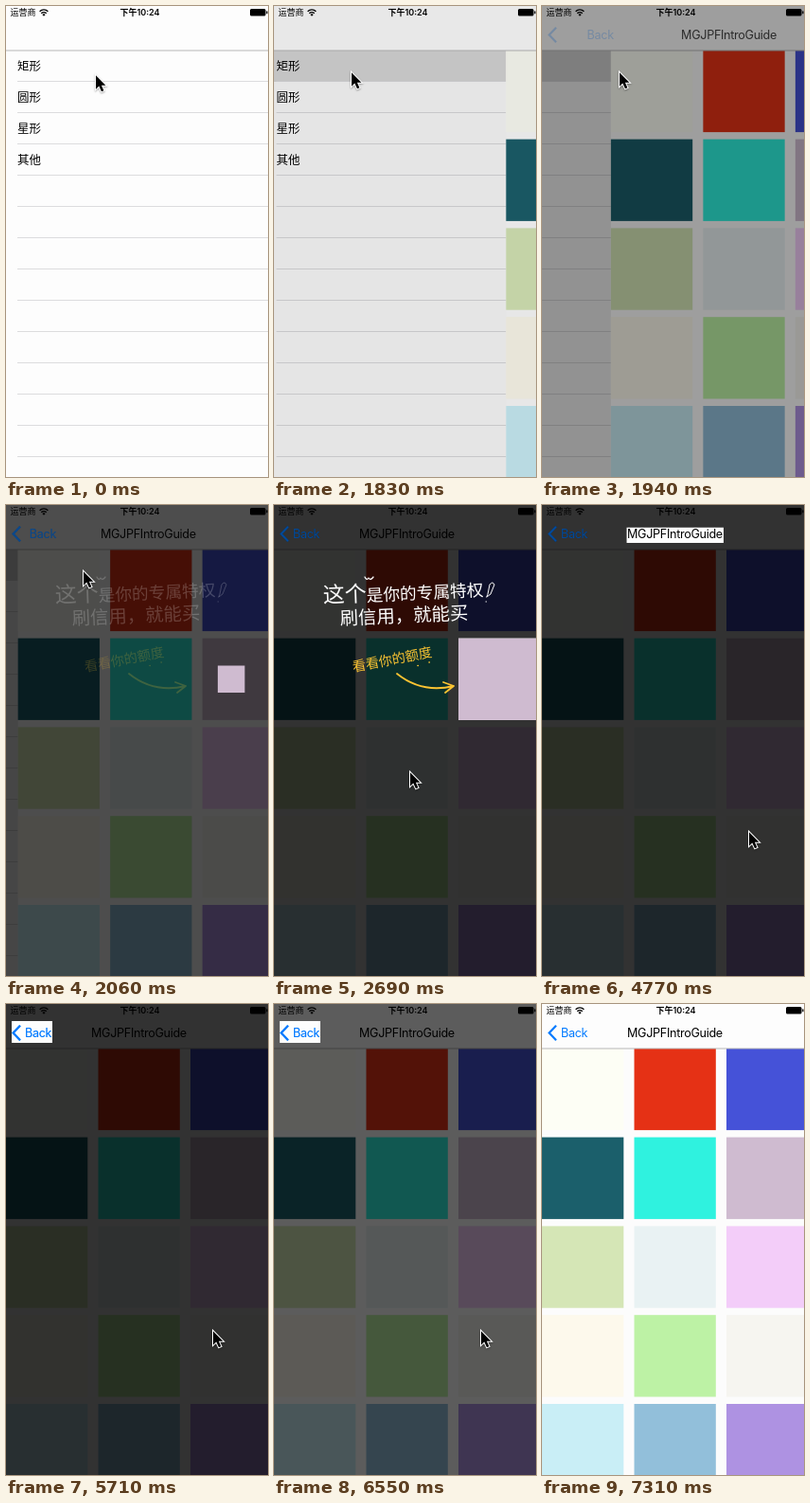
An HTML page with a canvas for the animation above (7970 ms loop, 277 by 497 pixels).

```html
<!DOCTYPE html>
<html lang="zh-CN">
<head>
<meta charset="utf-8">
<style>
  html, body { margin: 0; width: 100%; height: 100%; overflow: hidden; background: #fdfdfd; }
  canvas { display: block; width: 277px; height: 497px; }
</style>
</head>
<body>
<canvas></canvas>
<script>
const W = 277, H = 497, LOOP = 7970, NAV = 47;
const PUSH = 1800, DIM = 0.8, CELL = 86.3;
const FONT = 'Inter, "Noto Sans CJK SC", sans-serif';
const canvas = document.querySelector('canvas');
const ctx = canvas.getContext('2d');
const dpr = window.devicePixelRatio || 1;
canvas.width = W * dpr;
canvas.height = H * dpr;

const rows = ['矩形', '圆形', '星形', '其他'];
const cells = [
  '#fdfef5', '#e53115', '#4552d8',
  '#1b5f6b', '#2ff2df', '#cfbbd0',
  '#d5e6b6', '#e9f2f3', '#f3cdf9',
  '#fdf9ec', '#bdf2a5', '#f6f5f0',
  '#c9eef6', '#92bfda', '#ae92e2'
];
const cellPos = i => [i % 3 * 97.5, 46.8 + Math.floor(i / 3) * 93.8];

// Highlighted rectangles: start time, x, y, width, height
const stops = [
  [2000, ...cellPos(5), CELL, CELL],
  [3700, ...cellPos(10), CELL, CELL],
  [4490, 89.5, 23, 102.5, 16],
  [5400, 6, 18, 43, 23]
];
// Pointer path: time, x, y
const pointer = [
  [0, 94, 72], [30, 94, 72], [400, 81, 69], [2350, 81, 69], [2580, 141, 238],
  [2690, 143, 281], [2840, 143, 281], [3090, 146, 362], [3290, 146, 362],
  [3440, 147, 371], [4030, 147, 371], [4300, 218, 344], [7090, 218, 344],
  [7310, 155, 500], [LOOP, 155, 500]
];

const clamp = v => Math.max(0, Math.min(1, v));
const mix = (a, b, p) => a + (b - a) * p;
const easeOut = p => 1 - (1 - p) ** 1.7;

function rect(x, y, w, h, color) {
  ctx.fillStyle = color;
  ctx.fillRect(x, y, w, h);
}

function text(str, x, y, size, { color = '#000', weight = 400, align = 'left', spacing = 0, angle = 0 } = {}) {
  ctx.save();
  ctx.translate(x, y);
  ctx.rotate(angle);
  ctx.font = `${weight} ${size}px ${FONT}`;
  ctx.letterSpacing = spacing + 'px';
  ctx.textAlign = align;
  ctx.textBaseline = 'alphabetic';
  ctx.fillStyle = color;
  ctx.fillText(str, 0, 0);
  ctx.restore();
}

function stroke(path, color, width) {
  ctx.strokeStyle = color;
  ctx.lineWidth = width;
  ctx.stroke(new Path2D(path));
}

function drawList(x, selected) {
  ctx.save();
  ctx.translate(x, 0);
  rect(0, NAV, W, H, '#fdfdfd');
  if (selected) rect(0, NAV, W, 33, '#d9d9d9');
  for (let y = 79; y < H; y += 33) rect(12, y, W - 12, 1, '#dcdcde');
  rows.forEach((label, i) => text(label, 12, 67.6 + i * 33, 12.5));
  ctx.restore();
}

function drawGrid(x) {
  ctx.save();
  ctx.translate(x, 0);
  rect(0, NAV, W, H, '#fcfcfc');
  cells.forEach((color, i) => rect(...cellPos(i), CELL, CELL, color));
  ctx.restore();
}

function drawBack(p, alpha) {
  ctx.save();
  ctx.globalAlpha = alpha * p ** 5;
  stroke('M15 22.8 L7.6 30.5 L15 38.2', '#007aff', 2.2);
  text('Back', mix(125, 20, p), 35, 12.6, { color: '#007aff', spacing: -0.3 });
  ctx.restore();
}

function drawBars(p) {
  rect(0, 0, W, NAV, '#fdfdfd');
  rect(0, NAV - 0.5, W, 1, '#b8b8b8');
  text('运营商', 4.5, 10, 9);
  text('下午10:24', 141.5, 10, 9, { weight: 600, align: 'center' });
  stroke('M35.6 5.8 A6 6 0 0 1 44.4 5.8 M37.3 7.7 A3.7 3.7 0 0 1 42.7 7.7', '#000', 1.3);
  ctx.fillStyle = '#000';
  ctx.fill(new Path2D('M38.3 8.9 Q40 7.8 41.7 8.9 L40 10.8 Z'));
  ctx.beginPath();
  ctx.roundRect(258, 3, 16.5, 7.5, 1.5);
  ctx.roundRect(275.2, 5.2, 1.3, 3, 0.5);
  ctx.fill();
  if (p > 0) {
    ctx.globalAlpha = p;
    text('MGJPFIntroGuide', mix(307, 90, p), 35, 12.6, { spacing: -0.3 });
    ctx.globalAlpha = 1;
    drawBack(p, 1);
  }
}

function holeAt(t) {
  const i = stops.findLastIndex(s => t >= s[0]);
  if (i < 0) return null;
  const [start, x, y, w, h] = stops[i];
  const from = i ? stops[i - 1].slice(1) : [x + w / 2, y + h / 2, 0, 0];
  const p = easeOut(clamp((t - start) / 290));
  return from.map((v, k) => mix(v, stops[i][k + 1], p));
}

function drawDim(t, alpha) {
  const hole = holeAt(t);
  ctx.beginPath();
  ctx.rect(0, 0, W, H);
  if (hole) ctx.rect(...hole);
  ctx.fillStyle = `rgba(0,0,0,${alpha})`;
  ctx.fill('evenodd');
}

function drawHint(alpha) {
  const white = '#fff', yellow = '#fac332';
  ctx.save();
  ctx.globalAlpha = alpha;
  ctx.lineCap = ctx.lineJoin = 'round';
  text('这个', 52, 103, 23, { color: white, angle: -0.035 });
  text('是你的专属特权', 98, 102, 17.7, { color: white, angle: -0.05 });
  text('刷信用，就能买', 70, 126.5, 19.4, { color: white, angle: -0.045 });
  text('看看你的额度', 84, 176, 14.2, { color: yellow, angle: -0.19 });
  stroke('M96 76 q2 4 4 1 q2 3 5 -1', white, 1.3);
  stroke('M226 94 L228 84 Q231 80 233 84 L229 94 L225 97 Z M224 102 h.5', white, 1);
  stroke('M130 178 C145 190 165 197 190 191 M179 187 L190 191 L181 198', yellow, 1.8);
  stroke('M152 169.5 h.3 M164 166 h.3', yellow, 1.6);
  ctx.restore();
}

function drawPointer(t) {
  const i = Math.max(1, pointer.findIndex(k => k[0] > t));
  const [t0, x0, y0] = pointer[i - 1], [t1, x1, y1] = pointer[i];
  const p = (t - t0) / (t1 - t0);
  const arrow = new Path2D('M0 0 V14.5 L3.3 11.4 L6 17 L8.4 16 L5.9 10.6 H10.4 Z');
  ctx.save();
  ctx.translate(mix(x0, x1, p) + 1, mix(y0, y1, p) + 1.2);
  ctx.shadowColor = 'rgba(0,0,0,.35)';
  ctx.shadowBlur = 2 * dpr;
  ctx.shadowOffsetY = dpr;
  ctx.strokeStyle = '#fff';
  ctx.lineWidth = 2;
  ctx.stroke(arrow);
  ctx.shadowColor = 'transparent';
  ctx.fillStyle = '#000';
  ctx.fill(arrow);
  ctx.restore();
}

function draw(t) {
  const s = Math.max(0, t - PUSH) * 0.0186;
  const remaining = (1 + s) * Math.exp(-s);
  const pushed = 1 - remaining;
  const dim = DIM * clamp((t - PUSH) / 300) * (1 - clamp((t - 6510) / 200));

  ctx.setTransform(dpr, 0, 0, dpr, 0, 0);
  drawList(-0.3 * W * pushed, t >= PUSH);
  if (pushed > 0) {
    rect(0, NAV, W, H, `rgba(0,0,0,${0.1 * pushed})`);
    drawGrid(W * remaining);
  }
  drawBars(pushed);
  if (dim > 0) {
    drawDim(t, dim);
    // The button tint stays visible above the dimmed bar
    drawBack(pushed, 0.5 * dim / DIM);
    if (t < 3700) drawHint(clamp((t - 2000) / 300));
  }
  drawPointer(t);
}

function frame() {
  draw(performance.now() % LOOP);
  requestAnimationFrame(frame);
}
frame();
</script>
</body>
</html>
```
